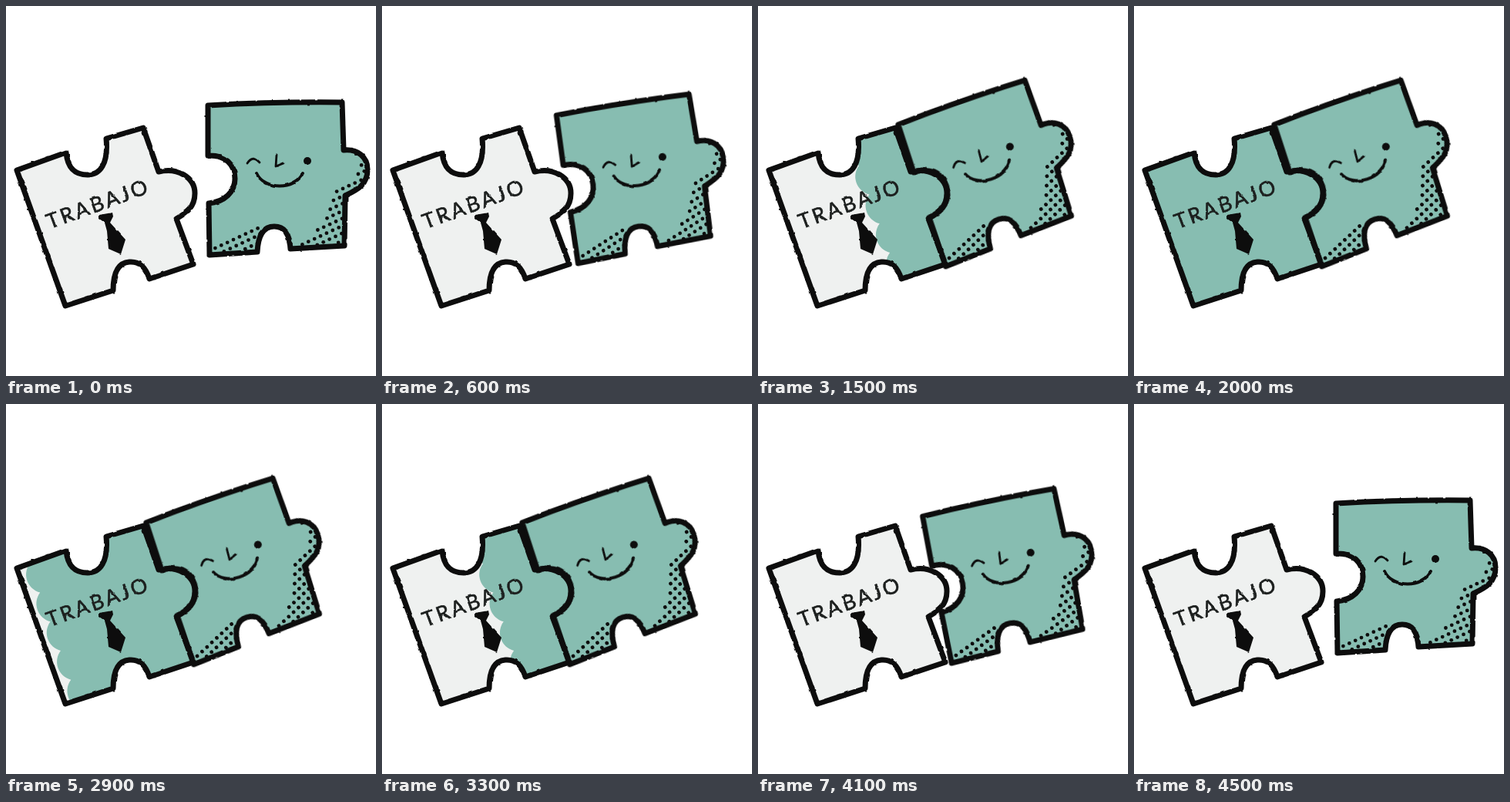
Write an HTML page that moves like this. It is 480 px wide and 480 px high and loops after 4.8 s.

```html
<!DOCTYPE html>
<html lang="es">
<head>
<meta charset="utf-8">
<title>Piezas</title>
<style>
  html, body { margin: 0; width: 100%; height: 100%; overflow: hidden; background: #fff; }
  svg { display: block; width: 100vw; height: 100vh; }
  .paper { fill: #eff1f0; }
  .teal { fill: #87bdb1; }
  .ink { fill: #0d0d0d; }
  .line { fill: none; stroke: #0d0d0d; stroke-width: 7; stroke-linejoin: round; stroke-linecap: round; }
  text { font: 27px Lato, "Open Sans", sans-serif; letter-spacing: 3px; fill: #1c1f1e; stroke: #1c1f1e; stroke-width: .6; }
</style>
</head>
<body>
<svg viewBox="0 0 480 480">
  <defs>
    <filter id="rough" filterUnits="userSpaceOnUse" x="0" y="0" width="480" height="480" color-interpolation-filters="sRGB">
      <feTurbulence type="fractalNoise" baseFrequency=".1" numOctaves="2" seed="4"/>
      <feDisplacementMap in="SourceGraphic" scale="2.5" xChannelSelector="R" yChannelSelector="G"/>
      <feGaussianBlur stdDeviation=".7"/>
    </filter>
    <path id="job" d="M14 213 L78 190 C80 213 92 219 106 219 C122 219 133 205 130 172 L178 158
      L198 215 C222 209 245 222 245 243 C245 262 233 269 221 276 L243 335
      L186 354 C181 338 173 331 160 332 C146 333 139 345 139 369 L77 389 Z"/>
    <path id="person" d="M262 129 Q350 124 436 125 L438 187 C456 185 469 196 469 212 C469 232 456 238 440 246
      L439 311 L369 315 C368 296 361 286 348 286 C334 286 327 298 326 319 L264 323
      L263 256 C284 254 297 241 297 224 C297 205 284 193 262 194 Z"/>
    <clipPath id="jobClip"><use href="#job"/></clipPath>
  </defs>

  <use href="#job" class="paper"/>
  <g clip-path="url(#jobClip)"><path id="wash" class="teal"/></g>

  <g id="mover">
    <use href="#person" class="teal"/>
    <path id="shadeLeft" class="teal" d="M264 312 C290 306 305 298 328 287 L326 317 L264 321 Z"/>
    <path id="shadeRight" class="teal" d="M370 308 C400 296 420 288 422 240 C440 238 456 222 457 200
      L470 210 L462 232 L441 246 L438 309 L370 313 Z"/>
    <g id="dots" class="ink"></g>
    <g filter="url(#rough)">
      <use href="#person" class="line"/>
      <path class="line" style="stroke-width:2.8" d="M313 204 Q320 193 329 203 M351 193 L350 208 L360 204"/>
      <path class="line" style="stroke-width:4" d="M325 217 C335 239 375 239 385 217"/>
      <circle class="ink" cx="391" cy="201" r="5"/>
    </g>
  </g>

  <g filter="url(#rough)">
    <use href="#job" class="line"/>
    <path class="ink" d="M121 271 L138 268 L139 273 L135 281 L155 303 L149 322 L133 315 L131 292 L128 281 L121 276 Z"/>
    <text transform="translate(56.5 289.5) rotate(-20)">TRABAJO</text>
  </g>
</svg>
<script>
  const byId = id => document.getElementById(id);
  const STEP = 100, STEPS = 48;

  // Halftone shading: a tilted grid, kept where it falls inside the shaded areas
  function drawDots() {
    const ctx = document.createElement('canvas').getContext('2d');
    const shades = ['shadeLeft', 'shadeRight'].map(id => new Path2D(byId(id).getAttribute('d')));
    const tilt = -25 * Math.PI / 180, pitch = 8.7;
    let dots = '';
    for (let i = -16; i <= 16; i++) {
      for (let j = -16; j <= 16; j++) {
        const x = 366 + pitch * (i * Math.cos(tilt) - j * Math.sin(tilt));
        const y = 270 + pitch * (i * Math.sin(tilt) + j * Math.cos(tilt));
        if (shades.some(shade => ctx.isPointInPath(shade, x, y)))
          dots += `<circle cx="${x.toFixed(1)}" cy="${y.toFixed(1)}" r="2.4"/>`;
      }
    }
    byId('dots').innerHTML = dots;
  }

  function pose(step) {
    const p = Math.min(1, Math.max(0, (step - 3) / 6));
    const q = p - p * (1 - p) * (.073 + .414 * p);
    byId('mover').setAttribute('transform',
      `translate(${-56.3 * q} ${5.9 * q - 12.6 * q * q}) rotate(${-18 * q} 350 220)`);

    const n = step - 11;
    const edge = 183 - 11.6 * n - 1.12 * n * n;
    byId('wash').setAttribute('transform', `translate(${edge} 172) rotate(-19.5)`);
    byId('wash').setAttribute('visibility', step < 10 ? 'hidden' : 'visible');
  }

  // The second half of the loop retraces the first
  function frame(now) {
    const k = Math.floor(now / STEP) % STEPS;
    pose(Math.min(k, STEPS - k, 20));
    requestAnimationFrame(frame);
  }

  // Colour wash with a scalloped leading edge
  byId('wash').setAttribute('d', 'M320 -43 H0' + 'a24 24 0 0 0 0 40'.repeat(8) + 'H320 Z');
  drawDots();
  pose(0);
  requestAnimationFrame(frame);
</script>
</body>
</html>
```
